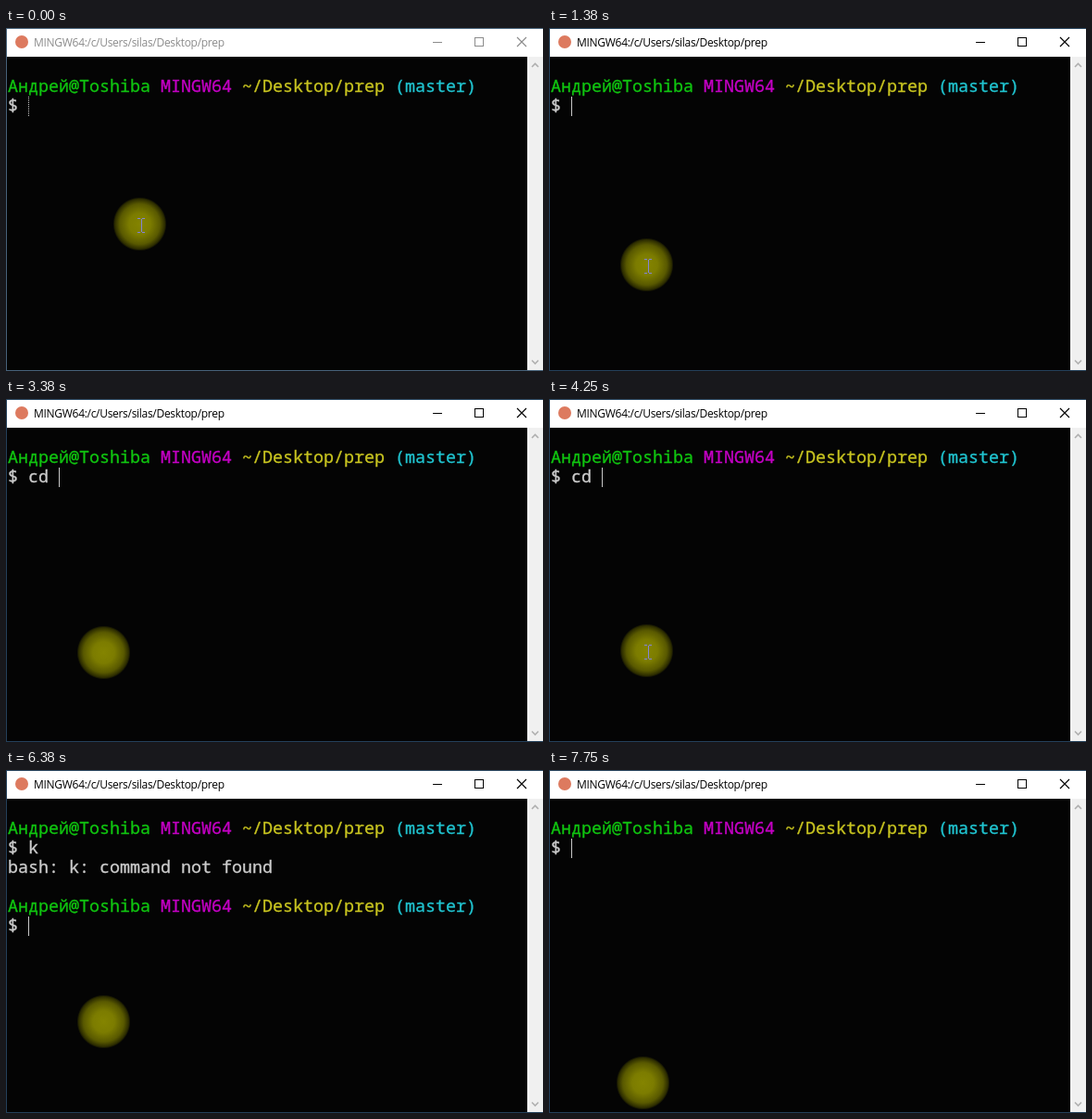
Recreate the animation shown at these times as an HTML page. Size 580 by 370 pixels, loop 8000 ms.

```html
<!DOCTYPE html>
<html lang="en">
<head>
<meta charset="utf-8">
<title>Terminal</title>
<style>
  html, body { margin: 0; width: 100%; height: 100%; overflow: hidden; background: #040404; }
  svg { display: block; width: 580px; height: 370px; }
  text { white-space: pre; }
  .title { font: 12px "Open Sans", "Noto Sans", sans-serif; letter-spacing: -.3px; fill: #000; }
  .term { font: 18.333px "Noto Sans Mono", "DejaVu Sans Mono", monospace; }
  .term tspan { color: #cccccc; fill: currentColor; stroke: currentColor; stroke-width: .35; }
  .term .user { color: #10c410; }
  .term .sys { color: #c400c4; }
  .term .dir { color: #c8c420; }
  .term .branch { color: #20c4d0; }
  .buttons { fill: none; stroke: #000; shape-rendering: crispEdges; }
  .close { shape-rendering: auto; stroke-width: 1.15; }
  .idle .title { fill: #8c8c8c; }
  .idle .buttons { stroke: #8c8c8c; }
  .arrows { fill: none; stroke: #b0b0b0; stroke-width: 1.6; }
  .edge { fill: none; stroke: #24405a; shape-rendering: crispEdges; }
  .idle .edge { stroke: #47627a; }
  .caret { stroke: #c8c8c8; shape-rendering: crispEdges; }
  .idle .caret { stroke-dasharray: 1 1; }
  .beam { fill: none; stroke: #8484d8; shape-rendering: crispEdges; }
</style>
</head>
<body>
<svg id="win" viewBox="0 0 580 370">
  <defs>
    <radialGradient id="glow">
      <stop offset="0" stop-color="#848400"/>
      <stop offset=".4" stop-color="#7c7c00"/>
      <stop offset=".75" stop-color="#595900"/>
      <stop offset=".93" stop-color="#2c2c00"/>
      <stop offset="1" stop-color="#2c2c00" stop-opacity="0"/>
    </radialGradient>
  </defs>
  <rect width="580" height="370" fill="#040404"/>
  <rect width="580" height="31" fill="#fff"/>
  <rect x="563" y="31" width="17" height="339" fill="#f0f0f0"/>
  <path class="arrows" d="M568 42l3.5-3.5l3.5 3.5M568 358.5l3.5 3.5l3.5-3.5"/>
  <circle cx="17" cy="15" r="7" fill="#dd7a5f"/>
  <text class="title" x="30" y="20">MINGW64:/c/Users/silas/Desktop/prep</text>
  <g class="buttons">
    <path d="M461 15.5h10M506.5 10.5h9v9h-9z"/>
    <path class="close" d="M552 10l10 10M562 10l-10 10"/>
  </g>
  <path class="edge" d="M0 .5H580M.5 0V370M0 369.5H580"/>
  <g id="mouse">
    <circle r="29" fill="url(#glow)"/>
    <path id="beam" class="beam" d="M-2.5-6.5h3M2-6.5h3M-2.5 8.5h3M2 8.5h3M1.5-6V8"/>
  </g>
  <g id="screen" class="term"></g>
  <path id="caret" class="caret" d="M.5 0v21"/>
</svg>
<script>
const LOOP = 8000, FOCUS = 250, BLINK = 500, CELL = 11, ROW = 21, LEFT = 2, BASE = 69;
const el = id => document.getElementById(id);
const win = el('win'), mouse = el('mouse'), beam = el('beam');
const screen = el('screen'), caret = el('caret');

const PROMPT = [['user', 'Андрей@Toshiba '], ['sys', 'MINGW64 '],
                ['dir', '~/Desktop/prep '], ['branch', '(master)']];
const line = s => [['', s]];
const prompt = () => [PROMPT, line('$ ')];
const add = (rows, s) => [...rows.slice(0, -1), line(rows.at(-1)[0][1] + s)];

const type = c => rows => add(rows, c);
const erase = n => rows => [PROMPT, line(rows[1][0][1].slice(0, -n))];
const enter = rows => [...rows, line('')];
const fail = rows => [...rows.slice(0, -1), line('bash: k: command not found'), line(''), ...prompt()];

const keys = [
  [2000, type('c')], [2380, type('d')], [3000, type(' ')],
  [5000, erase(1)], [5250, erase(2)], [5380, type('k')],
  [5630, enter], [6000, fail], [7630, prompt]
];

// pointer key points: time, x, y
const path = [
  [250, 144.5, 211.5], [1000, 119, 206], [1380, 105.5, 255.5], [1750, 105.5, 273.5],
  [3750, 105.5, 273.5], [4000, 105.5, 271.5], [6380, 105.5, 271.5], [6750, 101.5, 337.5]
];

function pointAt(t) {
  const i = path.findIndex(p => p[0] > t);
  if (i < 1) return path.at(i).slice(1);
  const [a, b] = [path[i - 1], path[i]];
  const k = (t - a[0]) / (b[0] - a[0]);
  return [1, 2].map(n => a[n] + (b[n] - a[n]) * k);
}

const snap = t => t - t % 1000 + [0, 250, 380, 630, 750].findLast(s => s <= t % 1000);
const show = (node, on) => node.setAttribute('visibility', on ? 'visible' : 'hidden');
const move = (node, x, y) => node.setAttribute('transform', `translate(${x} ${y})`);

const markup = rows => rows.map((row, i) =>
  `<text x="${LEFT}" y="${BASE + i * ROW}">` +
  row.map(([c, s]) => `<tspan class="${c}">${s}</tspan>`).join('') + '</text>').join('');

let last;
function render(t) {
  if (t === last) return;
  last = t;
  const done = keys.filter(k => k[0] <= t);
  const rows = done.reduce((r, k) => k[1](r), prompt());
  const idle = t < FOCUS;
  const since = t - (done.length ? done.at(-1)[0] : FOCUS);
  screen.innerHTML = markup(rows);
  win.setAttribute('class', idle ? 'idle' : '');
  move(mouse, ...pointAt(t));
  show(beam, t < 2000 || (t >= 4000 && t < 5380));
  move(caret, LEFT + rows.at(-1)[0][1].length * CELL, 53 + (rows.length - 1) * ROW);
  show(caret, idle || since % (2 * BLINK) < BLINK);
}

const start = performance.now();
function tick() {
  render(snap((performance.now() - start) % LOOP));
  requestAnimationFrame(tick);
}
tick();
</script>
</body>
</html>
```
